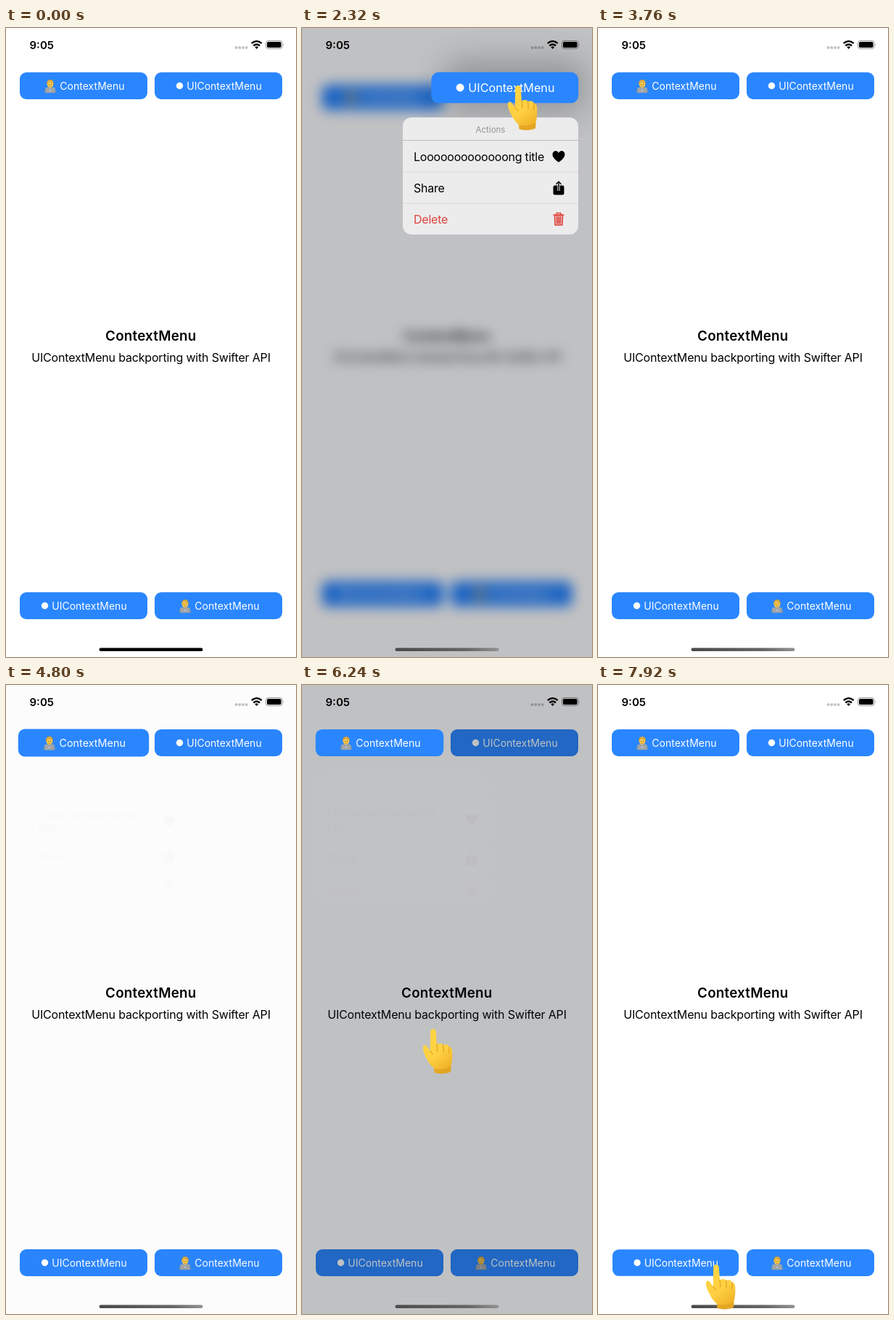
An HTML page that plays this animation: 400 px wide and 865 px high, repeating every 8 s.

```html
<!DOCTYPE html>
<html lang="en">
<head>
<meta charset="utf-8">
<title>ContextMenu</title>
<style>
  html, body { margin: 0; width: 100%; height: 100%; overflow: hidden; background: #fff; }
  svg { display: block; width: 100vw; height: 100vh; }
  text { font-family: Inter, Roboto, "Liberation Sans", sans-serif; white-space: pre; }
  .label { font-size: 14px; letter-spacing: .02px; fill: #fff; }
  .row { font-size: 16px; letter-spacing: -.23px; }
  .title { font-size: 18.8px; font-weight: 600; letter-spacing: .22px; }
  .subtitle { font-size: 16px; letter-spacing: -.18px; }
  .red { fill: #e0443c; }
</style>
</head>
<body>
<svg id="stage" viewBox="0 0 400 865" preserveAspectRatio="none"></svg>
<script>
const STEP = 80, LOOP = 8000;
const LONG = 'L' + 'o'.repeat(13) + 'ng';

// ---------- drawing ----------
const coder = `
  <path d="M.3 18.500C.3 13.500 3 11 8.500 11S16.700 13.500 16.700 18.500Z" fill="#6f8fa6"/>
  <path d="M4 8C3 3 5 .5 8.500 .5S14 3 13 8Z" fill="#c99a3a"/>
  <ellipse cx="8.500" cy="7" rx="4" ry="5" fill="#f8cb52"/>
  <path d="M4.300 6C4.500 2.500 6.500 1.500 8.500 1.500S12.500 2.500 12.700 6C11 5.500 9 4.700 7.500 3.800C6.500 5 5.500 5.700 4.300 6Z" fill="#dcae48"/>
  <circle cx="6.900" cy="7.200" r=".6" fill="#6b4a1c"/><circle cx="10.100" cy="7.200" r=".6" fill="#6b4a1c"/>
  <path d="M7 9.600Q8.500 10.600 10 9.600" stroke="#a9701c" stroke-width=".7" fill="none"/>
  <rect x="2" y="11.300" width="13" height="7.500" rx="1" fill="#a0a5a9"/>
  <circle cx="8.500" cy="15" r="1" fill="#d0d4d6"/>`;

// Buttons are drawn around their own centre.
const button = (id, system) => `<g id="${id}">
  <rect x="-88" y="-18.500" width="176" height="37" rx="9" fill="#2a86ff"/>
  ${system
    ? '<circle cx="-53.500" cy="0" r="4.700" fill="#fff"/><text class="label" x="-43.800" y="5.200">UIContextMenu</text>'
    : `<g transform="translate(-54.500 -9)">${coder}</g><text class="label" x="-32.700" y="5.200">ContextMenu</text>`}
</g>`;

const heart = '<path d="M0 8C-4 5-8.500 1.500-8.500-3C-8.500-8-2-9.500 0-4.800C2-9.500 8.500-8 8.500-3C8.500 1.500 4 5 0 8Z"/>';
const share = `<rect x="-7.500" y="-3.500" width="15" height="13" rx="2.200"/>
  <path d="M0-3.500V4" stroke="#eee" stroke-width="3.400"/>
  <path d="M0-8.500V3.500M-3.200-5.500L0-8.700L3.200-5.500" stroke="#000" stroke-width="1.400" fill="none" stroke-linecap="round"/>`;
const trash = `<g fill="none" stroke="#e0443c" stroke-width="1.400" stroke-linecap="round" stroke-linejoin="round">
  <path d="M-7-6H7M-3-6V-8.500H3V-6"/><path d="M-5.700-5.500L-5 8H5L5.700-5.500Z" fill="#e0443c" fill-opacity=".4"/>
  <path d="M-2.300-3L-2 5.500M0-3V5.500M2.300-3L2 5.500"/></g>`;

function menu(id, lines) {
  const first = lines.length > 1 ? 64 : 43.5;
  const row = (i, top, height, texts, icon, cls = '') => {
    const mid = top + height / 2;
    const words = texts.map((s, n) =>
      `<text class="row ${cls}" x="15" y="${mid + 6.500 + 20 * (n - (texts.length - 1) / 2)}">${s}</text>`).join('');
    return `<path d="M0 ${top}H242" stroke="${i ? '#dadadd' : '#bdbdc1'}" stroke-width="1"/>
      ${words}<g transform="translate(215 ${mid + .500})">${icon}</g>`;
  };
  const y2 = 31.5 + first, y3 = y2 + 43;
  return `<g id="${id}"><rect width="242" height="${y3 + 43}" rx="12" fill="#efeff0" fill-opacity=".95"/>
    <text x="121" y="21" font-size="11.500" fill="#949498" text-anchor="middle">Actions</text>
    ${row(0, 31.5, first, lines, heart)}${row(1, y2, 43, ['Share'], share)}${row(2, y3, 43, ['Delete'], trash, 'red')}</g>`;
}

const hand = `<g id="hand">
  <path fill="url(#skin)" d="M-3.800 4C-4-1.300 3.500-1.300 3.800 4L5 21.500C8 19.500 12 19.500 13.500 22C17 20.500 21 21.500 22 24.500C25 25 26.500 28 26.300 32
    C26.500 40 26 45 24.500 51L24 59C18 62 7 62 1.500 60L1 54C-5 49-8 43-12 35C-14 30-15 24-12.500 22.500C-9.500 21.500-7.500 26-4.300 30Z"/>
  <path d="M5 21.500Q6 27 5.500 31M13.500 22Q14.500 27 14 32M22 24.500Q22.500 29 21.500 33M-4.300 30Q-2 34 0 35"
    fill="none" stroke="#d9991c" stroke-width="1" stroke-linecap="round"/>
  <path d="M1 54Q12 58 24.500 51L24 59C18 62 7 62 1.500 60Z" fill="#c98a12" opacity=".35"/>
</g>`;

const dots = [317.5, 322.2, 326.9, 331.6].map(x => `<circle cx="${x}" cy="27" r="2" fill-opacity=".23"/>`).join('');
const status = `<text x="32.500" y="28.700" font-size="15" font-weight="600">9:05</text>${dots}
  <g fill="none" stroke="#000" stroke-width="2.300">
    <path d="M338.700 21.200Q345.700 15 352.700 21.200"/><path d="M341.300 24.300Q345.700 20.600 350.100 24.300"/></g>
  <path d="M343.300 26.300Q345.700 24.400 348.100 26.300L345.700 28.900Z"/>
  <rect x="358.500" y="17.500" width="22.500" height="11" rx="3.200" fill="none" stroke="#000" stroke-opacity=".4"/>
  <rect x="360" y="19" width="19.500" height="8" rx="1.800"/><path d="M382.300 21.200Q384 23 382.300 24.800Z" fill-opacity=".4"/>`;

stage.innerHTML = `
  <defs>
    <linearGradient id="skin" x1="0" y1="0" x2=".5" y2="1">
      <stop offset="0" stop-color="#ffd545"/><stop offset=".65" stop-color="#ffd042"/><stop offset="1" stop-color="#f2b52a"/>
    </linearGradient>
    <linearGradient id="bar"><stop offset="0" stop-color="#4a4a4a"/><stop offset=".7" stop-color="#666"/><stop offset="1" stop-color="#929292"/></linearGradient>
  </defs>
  <rect width="400" height="865" fill="#fff"/>
  <g id="page">
    ${button('leftBack', false)}${button('rightBack', true)}${button('lowLeft', true)}${button('lowRight', false)}
    <text class="title" x="199.800" y="430" text-anchor="middle">ContextMenu</text>
    <text class="subtitle" x="200" y="458.700" text-anchor="middle">UIContextMenu backporting with Swifter API</text>
  </g>
  <rect id="shade" width="400" height="865" fill="#040a10"/>
  <rect id="shadow" x="195" y="45" width="196" height="70" rx="20" style="filter:blur(22px)"/>
  ${menu('systemMenu', [LONG + ' title'])}${menu('customMenu', [LONG, 'title'])}
  ${button('leftTop', false)}${button('rightTop', true)}
  ${status}
  <rect id="home" x="128.500" y="852.500" width="143" height="4.600" rx="2.300"/>
  ${hand}`;

// ---------- motion: flat lists of time, value ----------
const motion = {
  open: [2000, 0, 2080, .35, 2160, .7, 2240, .92, 2320, 1, 3280, 1, 3360, .82, 3440, .5, 3520, .25, 3600, .1, 3680, 0],
  lift: [1280, 1, 1520, .97, 1680, .98, 1920, 1.057, 2000, 1.06, 2320, 1],
  glow: [1600, 0, 1920, 1, 3280, 1, 3680, 0],
  left: [4160, 1, 4400, .975, 4640, .99, 4800, 1.025, 5120, 1.05, 5920, 1.05, 6240, 1.003, 6400, 1],
  blur: [4800, 0, 5120, 1, 5920, 1, 6160, 0],
  dim: [4720, 0, 4800, .01, 5120, .25, 6240, .25, 6400, 0],
  show: [4720, 0, 4800, .012, 5120, 1, 5920, 1, 6240, .012, 6320, 0],
  grow: [4720, .86, 4800, .9, 5120, 1],
  low: [7600, 1, 7920, .989]
};
// start, end, fingertip x, y
const taps = [[1200, 2560, 298, 79], [3040, 3600, 157, 378], [4160, 4720, 120, 79], [5840, 6400, 181, 473], [7600, 8400, 163, 797]];

function at(list, t) {
  if (t <= list[0]) return list[1];
  for (let i = 2; i < list.length; i += 2) {
    if (t <= list[i]) {
      const p = (t - list[i - 2]) / (list[i] - list[i - 2]);
      return list[i - 1] + (list[i + 1] - list[i - 1]) * p;
    }
  }
  return list[list.length - 1];
}

const $ = id => document.getElementById(id);
const place = (id, x, y, s = 1) => $(id).setAttribute('transform', `translate(${x} ${y}) scale(${s})`);
const fade = (id, v) => { $(id).style.opacity = v; $(id).style.display = v > 0 ? '' : 'none'; };
const swap = (name, active) => {
  fade(name + 'Top', active ? 1 : 0);
  fade(name + 'Back', active ? 0 : 1);
};

function draw(t) {
  const m = {};
  for (const key in motion) m[key] = at(motion[key], t);

  const zoom = 1 - .045 * m.open;
  place('page', 200 * (1 - zoom), 432 * (1 - zoom), zoom);
  const blur = 9 * Math.max(m.open, m.blur);
  $('page').style.filter = blur ? `blur(${blur}px)` : 'none';
  fade('shade', Math.max(.25 * m.open, m.dim));
  fade('shadow', m.glow * (.09 + .14 * m.open));

  swap('right', t > 1200 && t < 3680);
  place('rightTop', 293 - 13.2 * m.open, 79.5 + 2.5 * m.open, m.lift + .153 * m.open);
  swap('left', t > 4160 && t < 6400);
  place('leftTop', 107, 79.5, m.left);
  place('lowLeft', 107, 794.5, m.low);

  place('systemMenu', 280 - 141 * m.open, 91 + 32 * m.open, m.open);
  fade('systemMenu', m.open);
  place('customMenu', 140 - 121 * m.grow, 212 - 91 * m.grow, m.grow);
  fade('customMenu', m.show);

  $('home').setAttribute('fill', t < 2080 ? '#000' : 'url(#bar)');

  const tap = taps.find(p => t >= p[0] && t < p[1]);
  fade('hand', tap ? Math.min(1, (t - tap[0] + STEP) / 160, (tap[1] - t) / 160) : 0);
  if (tap) place('hand', tap[2], tap[3]);
}

place('leftBack', 107, 79.5);
place('rightBack', 293, 79.5);
place('lowRight', 293, 794.5);

const start = performance.now();
function tick() {
  const t = (performance.now() - start) % LOOP;
  draw(Math.floor(t / STEP) * STEP);
  requestAnimationFrame(tick);
}
tick();
</script>
</body>
</html>
```
